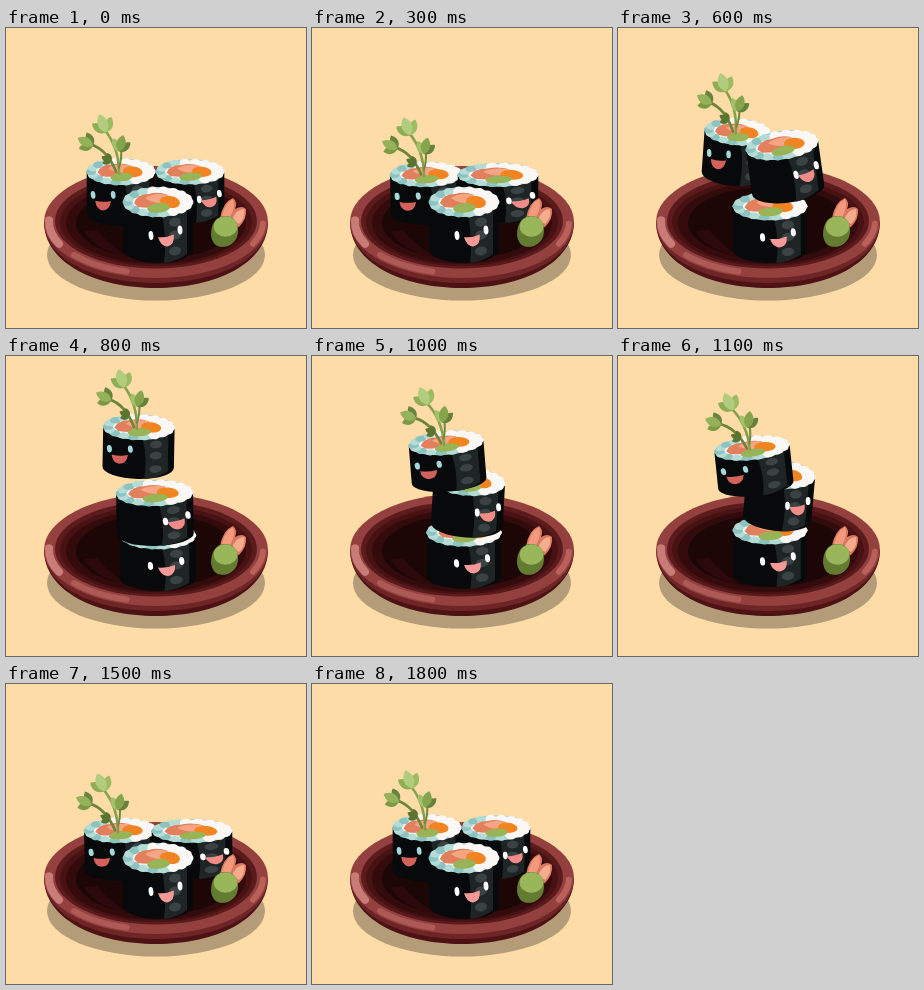
Write an HTML page that moves like this. It is 300 px wide and 300 px high and loops after 2000 ms.

```html
<!DOCTYPE html>
<html lang="en">
<head>
<meta charset="utf-8">
<title>Jumping sushi</title>
<style>
html, body { margin: 0; width: 100%; height: 100%; overflow: hidden; background: #fedca8; }
svg { display: block; width: 100vw; height: 100vh; }
</style>
</head>
<body>
<svg viewBox="0 0 300 300">
  <rect width="300" height="300" fill="#fedca8"/>
  <ellipse cx="150" cy="227" rx="109" ry="45.5" fill="#b59c79"/>
  <g id="plate"></g>
  <g id="rolls"></g>
  <g id="side">
    <path d="M214 190Q217 174 227 170Q232 174 229 181Q236 177 240 181Q241 191 233 199Q221 202 214 190Z" fill="#d9785e"/>
    <path d="M216 188Q219 175 227 171Q230 179 224 189Z" fill="#f29b7c"/>
    <path d="M226 192Q230 181 238 181Q240 190 233 196Z" fill="#f6ab8d"/>
    <path d="M205 207Q205 191 217 188Q230 187 232 200Q233 213 222 218Q207 222 205 207Z" fill="#647c32"/>
    <ellipse cx="219.5" cy="198.5" rx="11.8" ry="10.3" fill="#9ab65a"/>
  </g>
</svg>
<script>
const NS = "http://www.w3.org/2000/svg";
const plate = document.getElementById("plate");
const layer = document.getElementById("rolls");

function add(parent, tag, attrs) {
  const el = document.createElementNS(NS, tag);
  for (const k in attrs) el.setAttribute(k, attrs[k]);
  parent.appendChild(el);
  return el;
}
const group = (p, transform = "") => add(p, "g", { transform });
const path = (p, d, fill) => add(p, "path", { d, fill });
const line = (p, d, stroke, width) =>
  add(p, "path", { d, stroke, "stroke-width": width, fill: "none", "stroke-linecap": "round" });
const oval = (p, cx, cy, rx, ry, fill, turn = 0) =>
  add(p, "ellipse", { cx, cy, rx, ry, fill, transform: `rotate(${turn} ${cx} ${cy})` });

// Shine along the rim between two angles in degrees
function shine(from, to, color, width) {
  const at = deg => {
    const a = deg * Math.PI / 180;
    return `${150 + 107 * Math.cos(a)} ${194 + 51.5 * Math.sin(a)}`;
  };
  line(plate, `M${at(from)}A107 51.5 0 0 1 ${at(to)}`, color, width);
}

function drawPlate() {
  path(plate, "M38 194C38 235 90 260 150 260S262 235 262 194Z", "#4d1214");
  path(plate, "M39 202C45 235 95 255 150 255S255 235 261 202Z", "#6f2526");
  oval(plate, 150, 194, 112, 56, "#93403f");
  shine(155, 182, "#c97b77", 8);
  shine(106, 140, "#ad5a56", 6);
  shine(2, 25, "#b9605b", 6);
  oval(plate, 150, 193, 101, 47.5, "#5b1b1d");
  oval(plate, 150, 194, 96, 44, "#481214");
  oval(plate, 150, 195, 90, 41, "#340b0d");
  oval(plate, 150, 195, 80, 36, "#1c0606");
  path(plate, "M78 203Q88 222 122 229Q99 213 91 202Z", "#2c0a0b");
}

// Local space: bottom centre of the roll at 0,0
function makeRoll(face) {
  const g = group(layer);
  path(g, "M-35 -61V-14A35 14 0 0 0 35 -14V-61Z", "#08090a");
  path(g, "M4 -47Q18 -49 29 -55V-9Q18 -1 6 0Q9 -24 4 -47Z", "#1f2525");
  for (const y of [-41, -28, -12]) oval(g, 17, y, 6, 4.5, "#3a4243", -12);

  oval(g, 0, -61, 35, 15, "#a5d4cf");
  oval(g, 4, -62, 30, 12.5, "#fbf7f5");
  const bumps = 18;
  for (let i = 0; i < bumps; i++) {
    const a = i / bumps * 2 * Math.PI;
    const x = 30.5 * Math.cos(a), y = -61 + 11.8 * Math.sin(a);
    const teal = x < -12 || (y > -57 && x < 8);
    oval(g, x, y, 5, 3.8, teal ? (i % 2 ? "#8cc3c1" : "#b4dcd7") : "#fbf7f5");
  }

  path(g, "M-24 -60Q-21 -69 -9 -69Q0 -72 10 -68L5 -57Q-8 -54 -20 -56Z", "#e27f5c");
  path(g, "M-13 -65Q-4 -71 10 -68Q10 -62 2 -60Q-7 -60 -13 -65Z", "#f4a684");
  oval(g, 12, -61, 10, 6, "#f08420", 8);
  oval(g, 0.5, -55, 11.5, 4.8, "#98b457", -5);

  for (const [x, y] of face.eyes) oval(g, x, y, 2.4, 4.4, face.white, -6);
  const mouth = group(g, `translate(${face.mouth}) rotate(${face.tilt})`);
  path(mouth, "M-8 -4Q0 -2 8 -4.5Q7.5 6 0 6.5Q-6.5 5.5 -8 -4Z", face.pink);
  return g;
}

// Three pointed lobes fanned out from one stalk
function leaf(parent, x, y, turn, size, colors) {
  const g = group(parent, `translate(${x} ${y}) rotate(${turn}) scale(${size})`);
  [-38, 38, 0].forEach((fan, i) => {
    const lobe = path(g, "M0 0C-7 -5 -6 -13 0 -18C6 -13 7 -5 0 0Z", colors[i % colors.length]);
    lobe.setAttribute("transform", `rotate(${fan}) scale(${i < 2 ? .85 : 1})`);
  });
}

function makeSprout() {
  const g = group(layer);
  line(g, "M0 0Q0 -26 -14 -43", "#86a04a", 2.6);
  line(g, "M-3 -2Q-12 -24 -28 -29", "#6d8539", 2.8);
  line(g, "M0 -6Q3 -16 2 -25", "#6f8a3d", 2);
  leaf(g, -8, -12, -62, .6, ["#5b7430"]);
  leaf(g, -26, -28, -64, .95, ["#7c9a43", "#68843a", "#95b25a"]);
  leaf(g, 0, -22, 14, .95, ["#a3c068", "#66823a", "#86a44c"]);
  leaf(g, -13, -41, -20, 1.08, ["#8fae54", "#9dbb62", "#b1cc7c"]);
  return g;
}

drawPlate();
const left = makeRoll({ eyes: [[-28.5, -35], [-8, -35]], mouth: "-18.5 -24", tilt: 3,
  white: "#a5d8d9", pink: "#d3625d" });
const right = makeRoll({ eyes: [[9.5, -28], [30, -35]], mouth: "20 -25", tilt: -13,
  white: "#ffffff", pink: "#f08c87" });
const front = makeRoll({ eyes: [[-7, -27.5], [22, -33]], mouth: "8.5 -23", tilt: -8,
  white: "#ffffff", pink: "#f49996" });
const sprout = makeSprout();

// The beats: rest, crouch, leap, stack, tip, drop, crouch, rest
const beats = [0, 300, 600, 800, 1100, 1300, 1500, 1800];
const loop = (rest, crouch, ...air) => [rest, crouch, ...air, crouch, rest];
const squash = (h, y = 235) => [152, y, h ** -.8, h, 0];

// Pose: x, y, width, height, turn
const frontPoses = loop(squash(1), squash(1),
  squash(.93), squash(.91), squash(.93, 231), squash(1.1, 228));
const rightPoses = loop([184, 195, .98, .84, 0], [186, 195, 1.15, .79, 0],
  [172, 174.5, 1.04, .95, -8], [149.5, 190, 1.1, .87, -1],
  [158, 175, .98, .93, 5], [170, 160, .93, .9, 8]);
const leftPoses = loop([115, 198, .98, .89, 0], [115, 197, 1.03, .83, -1],
  [116, 158, .95, .89, 4], [132, 123, 1.02, .85, 1],
  [139, 140, 1.08, .79, -6], [121, 136, .98, .89, -5]);

// Smooth curve through the beats that never overshoots a pose
function poseAt(poses, t) {
  const n = Math.max(0, beats.findLastIndex(b => b <= t));
  if (n === beats.length - 1) return poses[n];
  const span = beats[n + 1] - beats[n], u = (t - beats[n]) / span;
  return poses[n].map((v, k) => {
    const slope = i => i < 0 || i > beats.length - 2 ? 0
      : (poses[i + 1][k] - poses[i][k]) / (beats[i + 1] - beats[i]);
    const speed = i => {
      const a = slope(i - 1), b = slope(i);
      return a * b > 0 ? 2 * a * b / (a + b) : 0;
    };
    const ease = u * u * (3 - 2 * u);
    return v + slope(n) * span * ease
      + span * u * (1 - u) * (speed(n) * (1 - u) - speed(n + 1) * u);
  });
}

function place(el, [x, y, w, h, turn]) {
  el.setAttribute("transform", `translate(${x} ${y}) rotate(${turn}) scale(${w} ${h})`);
}

function orderAt(t) {
  if (t >= 500 && t < 700) return [left, sprout, front, right];
  if (t >= 700 && t < 1300) return [front, right, left, sprout];
  return [left, sprout, right, front];
}

function draw(ms) {
  let t = Math.floor(ms % 2000 / 100) * 100;
  if (t < beats[1]) t = 0;
  const pose = poseAt(leftPoses, t), [x, y, w, h, turn] = pose;
  place(left, pose);
  place(right, poseAt(rightPoses, t));
  place(front, poseAt(frontPoses, t));
  sprout.setAttribute("transform",
    `translate(${x} ${y}) rotate(${turn}) translate(${-2 * w} ${-59 * h})`);
  layer.append(...orderAt(t));
}

let start, last = -1;
function tick(now) {
  start ??= now;
  const step = Math.floor((now - start) / 100);
  if (step !== last) draw((last = step) * 100);
  requestAnimationFrame(tick);
}
draw(0);
requestAnimationFrame(tick);
</script>
</body>
</html>
```
